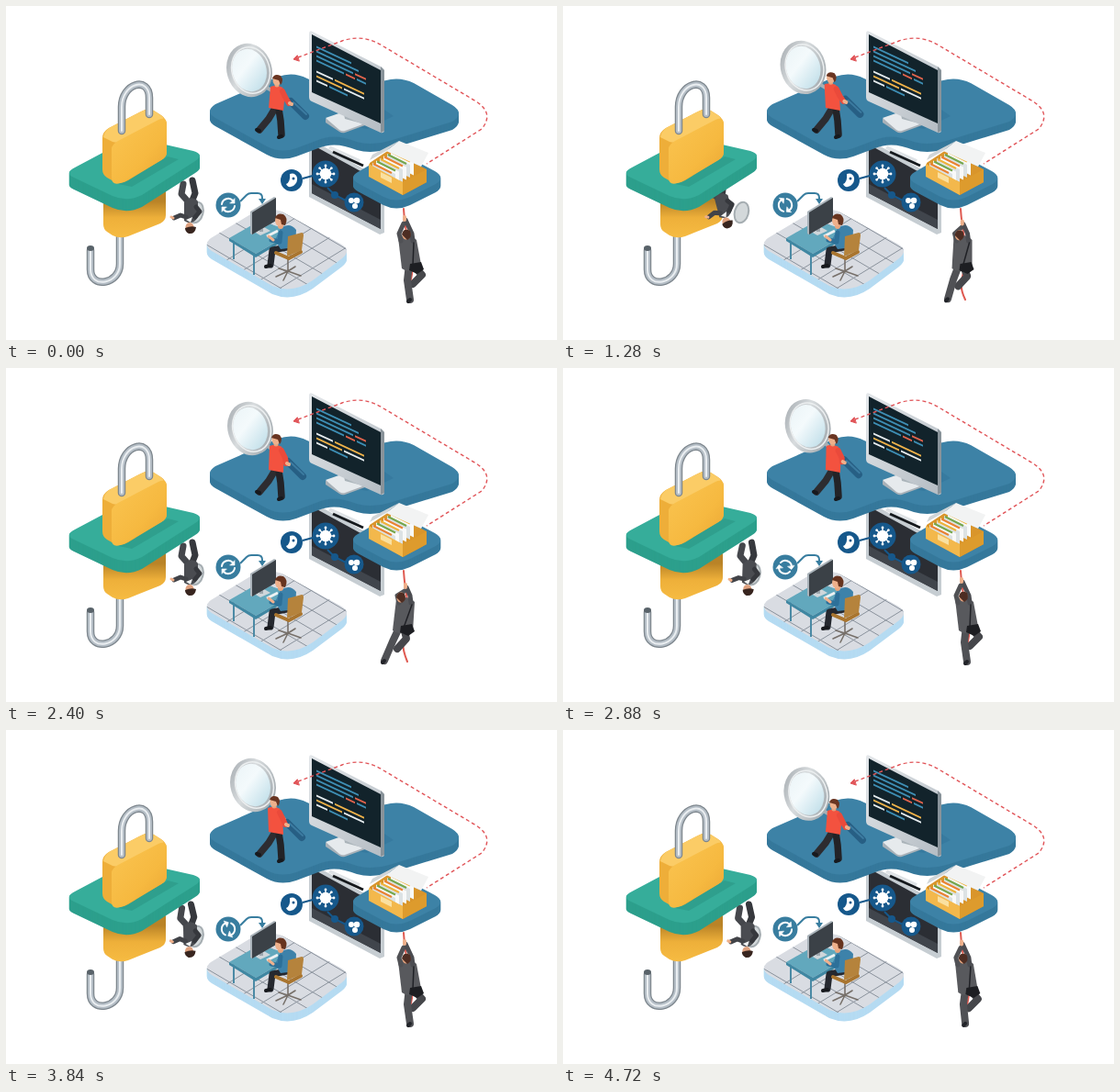
These frames come from a looping animation (600x364 px, 4800 ms). An HTML page:

```html
<!DOCTYPE html>
<html lang="en">
<head>
<meta charset="utf-8">
<title>Isometric security scene</title>
<style>
html, body { margin: 0; width: 100%; height: 100%; overflow: hidden; background: #fff; }
svg { display: block; width: 100vw; height: 100vh; }
.limb { fill: none; stroke-linecap: round; stroke-linejoin: round; }
</style>
</head>
<body>
<svg id="stage" viewBox="0 0 600 364">
<defs>
  <linearGradient id="gold" x2="1" y2="1"><stop stop-color="#fac552"/><stop offset=".6" stop-color="#f6b940"/><stop offset="1" stop-color="#e9a533"/></linearGradient>
  <linearGradient id="under" x2="0" y2="1"><stop offset=".3" stop-color="#b98327"/><stop offset=".62" stop-color="#eeb03a"/><stop offset="1" stop-color="#f6bb42"/></linearGradient>
  <linearGradient id="glass" x2=".6" y2="1"><stop stop-color="#e9f3f6"/><stop offset=".5" stop-color="#f4fafc"/><stop offset="1" stop-color="#c3e0ea"/></linearGradient>
  <linearGradient id="rim" x2="1" y2="1"><stop stop-color="#a5abb0"/><stop offset=".4" stop-color="#d8dcde"/><stop offset="1" stop-color="#9ba3a8"/></linearGradient>
  <linearGradient id="metal" x2="1" y2="1"><stop stop-color="#e4e7ea"/><stop offset="1" stop-color="#b4bcc3"/></linearGradient>
  <path id="floorTop" d="M223 253L268 226Q285 217 302 225L364 259Q377 266 366 275L334 299Q312 314 290 305L224 267Q214 260 223 253Z"/>
  <path id="seaTop" d="M228 107L296 77Q313 71 328 79L345 87L400 86Q424 74 444 84L486 108Q500 117 486 126L424 145Q400 153 382 148Q358 138 340 146L316 155Q299 161 284 153L228 122Q216 115 228 107Z"/>
  <path id="shelfTop" d="M383 181L412 164Q424 158 437 164L467 180Q479 187 468 194L440 208Q425 215 411 208L383 193Q373 187 383 181Z"/>
  <path id="greenTop" d="M75 176L122 151Q140 142 160 148L204 158Q217 162 206 169L148 206Q132 214 116 207L74 187Q63 182 75 176Z"/>
  <clipPath id="floorClip"><use href="#floorTop"/></clipPath>
</defs>

<!-- lock below the green plate -->
<g class="limb" id="hook"></g>
<path d="M106 205L174 196V228Q174 234 168 237L133 251Q124 254 116 250L110 246Q106 243 106 238Z" fill="url(#under)"/>
<g id="fly"></g>

<!-- green plate and lock -->
<g id="green"></g>
<path d="M122 194L176 164L188 167L137 197Z" fill="#2b9685" opacity=".6"/>
<path d="M105 144Q105 137 112 133L147 115Q154 111 161 114L169 119Q175 123 175 130V159Q175 165 169 168L133 190Q125 195 117 191L110 187Q105 184 105 178Z" fill="#eeae39"/>
<path d="M106 143Q107 137 112 133L147 115Q154 111 161 114L170 120Q174 123 168 126L128 147Q121 150 116 148Z" fill="#fbcc66"/>
<path d="M115 156Q115 151 122 147L166 124Q175 120 175 129V159Q175 165 169 168L130 191Q115 198 115 187Z" fill="url(#gold)"/>
<g class="limb" id="shackle"></g>

<!-- large plate with the screens -->
<path d="M330 149L335 147L412 190V247L407 249L330 208Z" fill="#c6cdd2"/>
<path d="M333 151L408 192V243L333 204Z" fill="#2b2e34"/>
<path d="M333 194L408 233V243L333 204Z" fill="#40454c"/>
<path d="M352 154L385 169" stroke="#dfe3e6" stroke-width="4"/>
<path d="M356 159L389 174" stroke="#15191d" stroke-width="3"/>
<g id="sea"></g>
<path d="M360 128L393 134L422 120L405 108Z" fill="#2f6f93" opacity=".4"/>
<path d="M348 123L374 114L391 130L369 138Q366 139 363 137L348 127Z" fill="#a8b1b8"/>
<path d="M348 122L374 113L391 128L369 136Q366 137 363 135Z" fill="#e6eaed"/>
<path d="M366 108L382 115L384 127L369 123Z" fill="#aab3b9"/>
<path d="M330 30Q330 26 334 28L408 66Q412 68 412 72V135Q412 139 408 138L333 104Q330 103 330 99Z" fill="url(#metal)"/>
<path d="M408 66L412 70V136L408 138Z" fill="#89939a"/>
<path d="M333 31L408 70V128L333 94Z" fill="#12232b"/>
<g id="code" transform="matrix(1 .47 0 1 335 33)"></g>
<g class="limb" stroke="#e15559" stroke-width="1.4">
  <path d="M318 56L366 38Q390 30 411 44L512 104Q532 117 518 134L458 172" stroke-dasharray="4 3" stroke-linecap="butt"/>
  <path d="M317 54L313 58L319 60Z" fill="#e15559" stroke-width="1"/>
</g>

<!-- shelf with the card box -->
<g id="shelf"></g>
<g transform="translate(0 -3)">
  <path d="M396 174L417 160L458 181V195L432 209L396 188Z" fill="#d9952b"/>
  <g id="cards"></g>
  <path d="M395 175L432 195V209L395 189Z" fill="#f3b84c"/>
  <path d="M432 195L458 181V195L432 209Z" fill="#dd9b2d"/>
  <path d="M408 184L420 190V196L408 190Z" fill="#fae0a0"/>
  <path d="M414 161L428 150L460 163L452 178Z" fill="#f2f3f3"/>
  <path d="M414 161L428 150L399 165L396 171Z" fill="#d0d5d7"/>
</g>

<!-- round icons -->
<path d="M323 188L334 185M350 198L358 206L370 212" fill="none" stroke="#16588b" stroke-width="2"/>
<circle cx="358" cy="206" r="4" fill="#16588b"/>
<g fill="#16588b">
  <circle cx="311" cy="190" r="12"/><circle cx="348" cy="183" r="14.5"/><circle cx="379" cy="214" r="10.5"/>
</g>
<path d="M309 183Q315 181 317 187Q318 192 313 196Q307 199 305 194Q310 192 309 183Z" fill="#fff"/>
<circle cx="313" cy="188" r="1.5" fill="#16588b"/>
<g id="germ" stroke="#fff" stroke-width="1.4"></g>
<g fill="#fff"><circle cx="376" cy="212" r="3"/><circle cx="382" cy="212" r="3.3"/><circle cx="380" cy="218" r="3"/></g>

<!-- office floor -->
<g id="floor"></g>
<g id="tiles" clip-path="url(#floorClip)" stroke="#8a929c" stroke-width="1"></g>
<path d="M248 254V276M270 270V293M308 246V265" stroke="#4b8aa5" stroke-width="2"/>
<path d="M243 253L276 234L314 246L272 270Z" fill="#62a8bd"/>
<path d="M243 253V256L272 274L314 249V246L272 270Z" fill="#3f87a2"/>
<path d="M270 246L281 241L288 245L277 250Z" fill="#cfd6da"/>
<path d="M278 234V246" stroke="#9ca6ad" stroke-width="4"/>
<path d="M266 224L292 208L294 209V234L268 249L266 248Z" fill="#aab3ba"/>
<path d="M268 225L294 209V234L268 249Z" fill="#3b4147"/>
<path d="M284 251L296 245" stroke="#eef2f4" stroke-width="3"/>
<g class="limb">
  <path d="M307 275V290M307 289L294 295M307 289L321 294M307 289L302 299M307 289L315 284M307 289L297 286" stroke="#77706a" stroke-width="1.6"/>
  <path d="M306 263L290 266L288 282" stroke="#25282f" stroke-width="7"/>
  <path d="M288 283L283 284" stroke="#17191d" stroke-width="4"/>
  <path d="M294 269L308 275L321 268" stroke="#a9752f" stroke-width="4"/>
  <path d="M299 242Q309 235 316 244L315 263L299 265L293 255Z" fill="#3d82aa"/>
  <path d="M299 247L298 257L289 255" stroke="#2d7099" stroke-width="5"/>
  <path d="M291 255L286 251" stroke="#efb18e" stroke-width="3"/>
  <path d="M307 251L322 247Q324 247 324 250L322 266L306 273Z" fill="#b5833c"/>
  <path d="M299 237V240" stroke="#e9a67f" stroke-width="6"/>
</g>
<ellipse cx="298" cy="234" rx="5" ry="6" fill="#eeb08b"/>
<path d="M293 231Q295 225 302 227Q308 231 304 239L300 238L299 233Z" fill="#67341f"/>

<circle cx="242" cy="217" r="13.5" fill="#387d9f"/>
<g id="sync" class="limb" stroke="#fff" stroke-width="2">
  <path d="M-7 -1A7 7 0 0 1 5 -5M7 1A7 7 0 0 1 -5 5"/>
  <path d="M7 -7V-2H2ZM-7 7V2H-2Z" fill="#fff" stroke-width=".6"/>
</g>
<path d="M255 213L262 206Q264 204 267 204H274Q279 204 279 209V212" fill="none" stroke="#387d9f" stroke-width="2"/>
<path d="M275 210H283L279 216Z" fill="#387d9f"/>

<g id="search"></g>
<g id="climb"></g>
</svg>
<script>
const LOOP = 4800, STEP = 80;
const $ = id => document.getElementById(id);
const put = (id, html) => { $(id).innerHTML = html; };
const mix = (a, b, k) => a.map((v, i) => v + (b[i] - v) * k);
const path = (d, fill) => `<path d="${d}" fill="${fill}"/>`;
const limb = (p, color, w) => `<polyline class="limb" points="${p.map(v => v.toFixed(2)).join(" ")}" stroke="${color}" stroke-width="${w}"/>`;
const oval = (x, y, rx, ry, turn, style) => `<ellipse rx="${rx}" ry="${ry}" transform="translate(${x} ${y}) rotate(${turn})" ${style}/>`;

const tube = d => [["#7d868d", 8.5], ["#b5bec6", 6], ["#eaeef1", 2]]
  .map(([c, w]) => `<path d="${d}" stroke="${c}" stroke-width="${w}"/>`).join("");

// a plate is its top shape stacked downwards
function plate(id, depth, side, top) {
  let s = "";
  for (let y = depth; y >= 0; y--)
    s += `<use href="#${id}Top" y="${y}" fill="${y ? side : top}"/>`;
  put(id, s);
}

function buildStill() {
  plate("green", 13, "#2c9f8c", "#36ad9a");
  plate("sea", 9, "#35789b", "#3d82a6");
  plate("shelf", 9, "#35789b", "#3d82a6");
  plate("floor", 9, "#b5dbf2", "#d9dce2");

  put("shackle", tube("M126 136V110C126 84 156 76 156 100V118"));
  put("hook", tube("M124 246V281C124 303 92 309 92 287V266") +
    '<ellipse cx="92" cy="264" rx="4" ry="3" fill="#59636a"/>');

  // row height, then colour and length of each dash
  const blue = "#3e8fb5", white = "#e7edf0", amber = "#f0b34a", red = "#e2644d";
  const rows = [[9, blue, 38], [14, blue, 46], [19, blue, 40, red, 12], [24, blue, 30, red, 10, blue, 10],
    [36, white, 18, amber, 32], [41, amber, 28, white, 22], [46, white, 12, blue, 20]];
  put("code", rows.map(([y, ...parts]) => {
    let x = 3, s = "";
    for (let i = 0; i < parts.length; i += 2) {
      s += `<rect x="${x}" y="${y}" width="${parts[i + 1]}" height="2" fill="${parts[i]}"/>`;
      x += parts[i + 1] + 2;
    }
    return s;
  }).join(""));

  let cards = "";
  for (let i = 5; i >= 0; i--) {
    const x = 399 + i * 4, y = 174 - i * 2.5;
    cards += path(`M${x} ${y}l25 12v14l-25-12z`, i % 2 ? "#f8f9f9" : "#dce2e4") +
      `<path d="M${x + 1} ${y + 1}l20 10" stroke="${["#e98232", "#75a64c", "#eeb23b"][i % 3]}" stroke-width="2"/>`;
  }
  put("cards", cards);

  let germ = '<circle cx="348" cy="183" r="5.5" fill="#fff"/>';
  for (let i = 0; i < 8; i++)
    germ += `<g transform="translate(348 183) rotate(${i * 45})"><path d="M5 0H9"/><circle cx="9" r=".7"/></g>`;
  put("germ", germ);

  let tiles = "";
  for (let i = 0; i < 7; i++) {
    const x = 150 + i * 36;
    tiles += `<path d="M${x} 220l150 88M${x + 20} 320l150-92"/>`;
  }
  put("tiles", tiles);
}

// time, lens x/y, head x/y, grip x/y
const keys = [
  [0, 265, 70, 295, 81, 319, 113],
  [800, 262, 67, 292, 79, 317, 111],
  [1760, 262, 67, 292, 78, 316, 111],
  [2400, 266, 66, 294, 78, 316, 111],
  [3280, 267, 61, 293, 78, 314, 108],
  [3840, 269, 60, 292, 78, 315, 110]
];
const keyAt = i => {
  const n = keys.length, turn = Math.floor(i / n), k = keys[i - turn * n];
  return [k[0] + turn * LOOP, ...k.slice(1)];
};

function spline(t) {
  let i = 0;
  while (keyAt(i + 1)[0] <= t) i++;
  const [p, a, b, q] = [-1, 0, 1, 2].map(j => keyAt(i + j));
  const d = b[0] - a[0], u = (t - a[0]) / d, w = u * u * (3 - 2 * u);
  return a.slice(1).map((v, j) => {
    const e = b[j + 1], m = (e - p[j + 1]) / (b[0] - p[0]) * d, n = (q[j + 1] - v) / (q[0] - a[0]) * d;
    return v + (e - v) * w + m * u * (1 - u) ** 2 - n * u * u * (1 - u);
  });
}

function drawSearch(t) {
  const [lx, ly, hx, hy, gx, gy] = spline(t);
  const sx = hx - 4, sy = hy + 11;
  put("search",
    limb([lx + 19, ly + 19, gx - 9, gy - 9], "#a8b0b5", 4) +
    oval(lx, ly, 21.5, 26.5, -16, 'fill="url(#glass)" stroke="url(#rim)" stroke-width="6"') +
    oval(lx + 1.5, ly, 20.5, 25.5, -16, 'fill="none" stroke="#eceff0" stroke-width="1.5"') +
    limb([292, 113, 286, 123, 276, 135], "#2d2c30", 7.5) +
    limb([297, 112, 299, 125, 300, 140], "#232327", 7.5) +
    limb([276, 136, 273, 135], "#17191d", 4) + limb([300, 142, 297, 143], "#17191d", 4) +
    limb([gx - 9, gy - 9, gx + 7, gy + 7], "#275f84", 8) +
    limb([gx - 6, gy - 8, gx + 8, gy + 5], "#3c7ba0", 2) +
    path(`M${sx - 3} ${sy - 4}Q${sx + 8} ${sy - 8} ${sx + 13} ${sy + 1}L302 114L286 111Z`, "#f3523f") +
    limb([sx + 10, sy + 1, sx + 14, sy + 9, gx - 11, gy - 7], "#ea4a3b", 6) +
    limb([gx - 10, gy - 7, gx - 8, gy - 6], "#eeb08b", 4) +
    limb([hx, hy + 3, hx, hy + 5], "#e6a37c", 5) +
    oval(hx, hy, 4.5, 5.5, 0, 'fill="#edb08c"') +
    path(`M${hx - 5} ${hy - 2}Q${hx - 3} ${hy - 8} ${hx + 4} ${hy - 5}Q${hx + 8} ${hy} ${hx + 4} ${hy + 5}L${hx + 2} ${hy}Z`, "#693522"));
}

// head, hand, shoulder, hip, then knee and foot of each leg
const reach = [436, 249, 434, 233, 433, 258, 440, 281, 437, 299, 440, 320, 453, 293, 443, 303];
const swing = [430, 250, 435, 239, 431, 258, 430, 281, 421, 298, 412, 319, 436, 295, 426, 306];

function drawClimb(t) {
  const k = (1 - Math.cos(t / 960 * 2 * Math.PI)) / 2;
  const [hx, hy, ax, ay, sx, sy, px, py, kx, ky, fx, fy, qx, qy, rx, ry] = mix(reach, swing, k);
  put("climb",
    `<path class="limb" d="M433 221Q434 238 438 258Q${445 - 8 * k} 280 ${441 - 9 * k} 298Q432 308 ${441 - 4 * k} 320" stroke="#df5950" stroke-width="2"/>` +
    limb([px + 3, py + 1, qx, qy, rx, ry], "#46474b", 8) +
    limb([px - 1, py, kx, ky, fx, fy], "#505155", 8) +
    limb([fx, fy, fx - 2, fy + 2], "#222429", 4) +
    path(`M${sx - 6} ${sy - 6}Q${sx + 6} ${sy - 11} ${sx + 14} ${sy - 3}L${px + 13} ${py + 6}Q${px} ${py + 11} ${px - 9} ${py + 5}Z`, "#58595d") +
    limb([sx - 3, sy - 2, sx - 5, sy - 10, ax - 1, ay + 4], "#505155", 5) +
    limb([sx + 10, sy - 2, sx + 9, sy - 10, ax + 1, ay], "#4b4c51", 5) +
    limb([ax, ay, ax, ay - 3], "#eeb08b", 4) +
    limb([sx + 11, sy, px + 3, py + 2], "#202126", 1.5) +
    path(`M${px} ${py}l12 -2l3 8l-7 5l-9 -4z`, "#1d1e22") +
    oval(hx, hy, 4.5, 5.5, 10, 'fill="#e5a37d"') +
    path(`M${hx - 5} ${hy}Q${hx - 3} ${hy - 8} ${hx + 4} ${hy - 4}Q${hx + 7} ${hy + 3} ${hx + 1} ${hy + 6}Z`, "#4d2d23"));
}

function drawFly(t) {
  // one stroll to the left and back, on top of a light sway
  const stroll = Math.exp(-(((t - 1160) / 370) ** 2));
  const sway = Math.sin(t / 2400 * 2 * Math.PI);
  put("fly",
    oval(207 - 14 * stroll, 225, 7.5, 11.5, 15, 'fill="#d3d8da" stroke="#a5adb1" stroke-width="2"') +
    `<g transform="translate(${-26 * stroll + sway} ${-6 * stroll}) rotate(${-16 * stroll + 2 * sway} 200 235)">` +
    limb([199, 214, 191, 205, 193, 194], "#45474c", 7) +
    limb([202, 214, 206, 204, 203, 190], "#36383d", 7) +
    path("M194 214Q202 205 209 213L209 230Q203 240 194 234Z", "#4a4c51") +
    limb([196, 230, 190, 228 + sway, 183, 231 + sway], "#414348", 5) +
    limb([182, 231 + sway, 180, 230 + sway], "#eeb08b", 3) +
    limb([206, 230, 211, 224, 207, 219], "#36383d", 5) +
    path("M196 233l5 3l2-6z", "#f1f3f4") +
    oval(200, 241, 4.5, 5, 0, 'fill="#dda07e"') +
    path("M195 242Q202 239 207 241Q206 249 199 248Q195 246 195 242Z", "#38251f") + "</g>");
}

function draw(now) {
  const t = Math.floor((now % LOOP) / STEP) * STEP;
  drawSearch(t);
  drawClimb(t);
  drawFly(t);
  $("sync").setAttribute("transform", `translate(242 217) rotate(${t / LOOP * 360})`);
}

buildStill();
draw(0);
let start;
function tick(now) {
  start ??= now;
  draw(now - start);
  requestAnimationFrame(tick);
}
requestAnimationFrame(tick);
</script>
</body>
</html>
```
